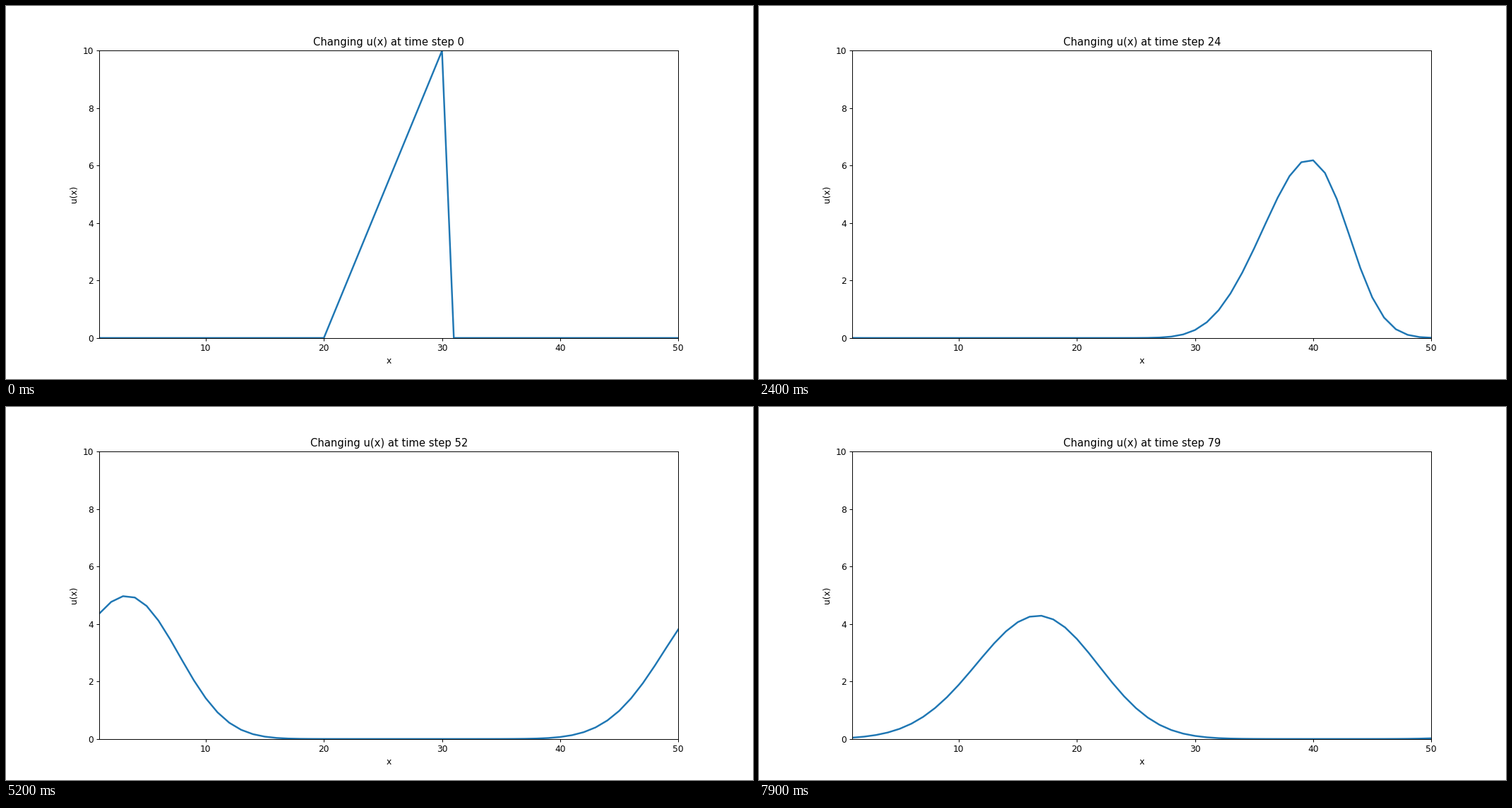
A matplotlib script for the animation above (8000 ms loop, 1058 by 529 pixels).

```python
import matplotlib.pyplot as plt
import numpy as np
from matplotlib.animation import FuncAnimation

WIDTH_IN, HEIGHT_IN = 12, 6
DPI = 529 / HEIGHT_IN  # 1058 x 529 pixels
STEPS = 80
COURANT = 0.5

x = np.arange(1, 51)


def solve():
    """First-order upwind advection on a periodic grid."""
    u = np.where((x >= 20) & (x <= 30), x - 20.0, 0.0)
    history = [u]
    for _ in range(STEPS - 1):
        u = u - COURANT * (u - np.roll(u, 1))
        history.append(u)
    return history


history = solve()

plt.rcParams["font.family"] = "DejaVu Sans"
fig, ax = plt.subplots(figsize=(WIDTH_IN, HEIGHT_IN), dpi=DPI)
ax.set_xlim(1, 50)
ax.set_ylim(0, 10)
ax.set_xlabel("x")
ax.set_ylabel("u(x)")
title = ax.set_title("")
line, = ax.plot([], [], color="#1f77b4", lw=2)


def draw(step):
    line.set_data(x, history[step])
    title.set_text(f"Changing u(x) at time step {step}")
    return line, title


anim = FuncAnimation(fig, draw, frames=STEPS, init_func=lambda: draw(0),
                     interval=100, repeat=True, repeat_delay=0, blit=False)
plt.show()
```
